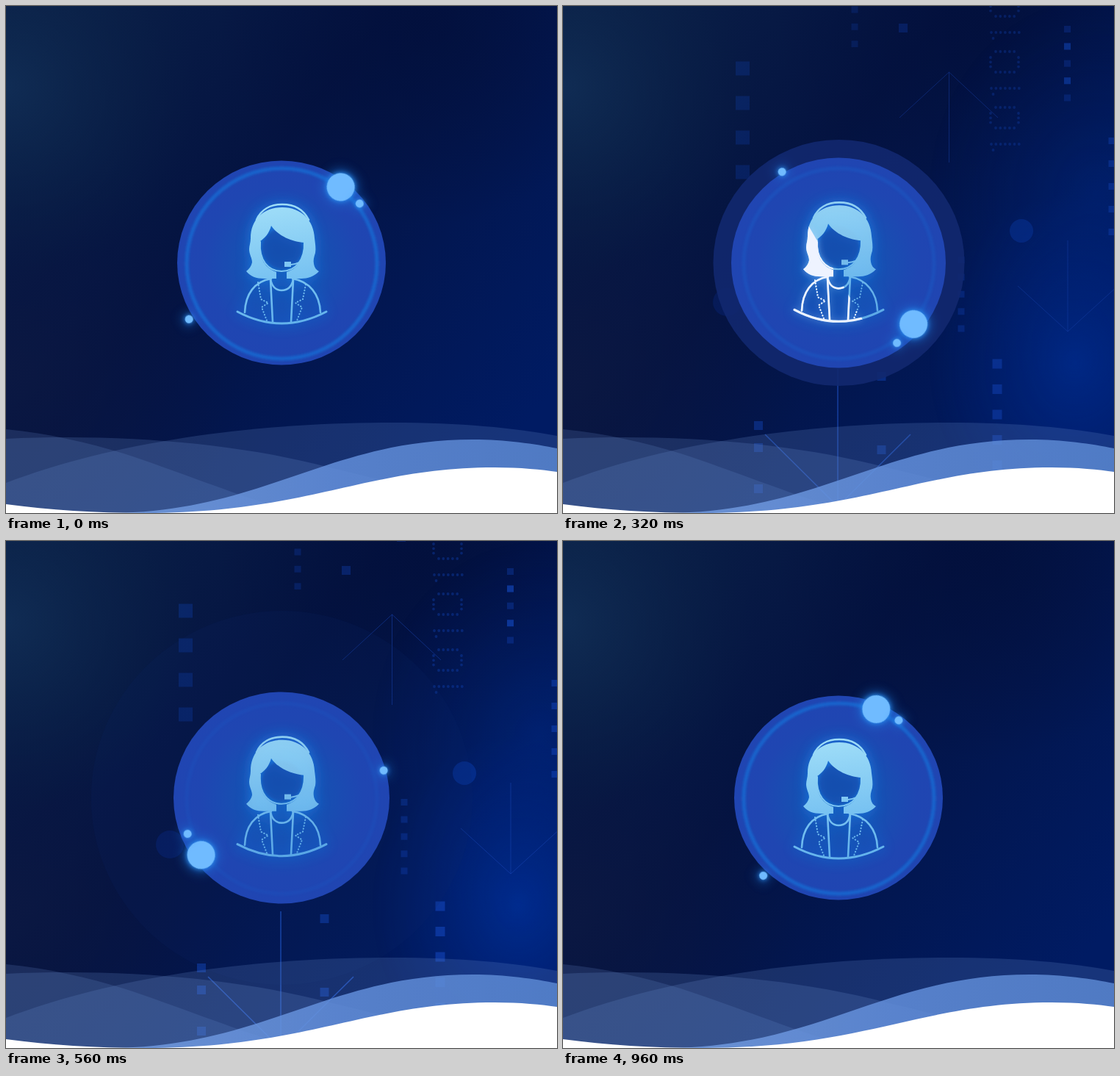
Recreate the animation shown at these times as an HTML page. Size 750 by 690 pixels, loop 1040 ms.

```html
<!DOCTYPE html>
<html lang="en">
<head>
<meta charset="utf-8">
<title>Support agent</title>
<style>
html, body { margin: 0; height: 100%; overflow: hidden; background: #04123f; }
svg { display: block; width: 100vw; height: 100vh; }
#orbit circle { fill: #70bbff; filter: drop-shadow(0 0 3px #2d8ff0) drop-shadow(0 0 8px #1c7be0); }
#shine { filter: drop-shadow(0 0 5px rgba(190, 220, 255, .45)); }
</style>
</head>
<body>
<svg viewBox="0 0 750 690" preserveAspectRatio="none">
  <defs>
    <linearGradient id="sky" x1="0" y1="0" x2="1" y2=".75">
      <stop offset="0" stop-color="#0b2148"/>
      <stop offset=".45" stop-color="#041341"/>
      <stop offset="1" stop-color="#001b63"/>
    </linearGradient>
    <radialGradient id="teal" gradientUnits="userSpaceOnUse" cx="0" cy="110" r="260">
      <stop offset="0" stop-color="#102c54"/>
      <stop offset="1" stop-color="#0a2145" stop-opacity="0"/>
    </radialGradient>
    <radialGradient id="dusk" gradientUnits="userSpaceOnUse" cx="0" cy="500" r="320">
      <stop offset="0" stop-color="#0b1842"/>
      <stop offset="1" stop-color="#081442" stop-opacity="0"/>
    </radialGradient>
    <radialGradient id="night" gradientUnits="userSpaceOnUse" cx="570" cy="20" r="280">
      <stop offset="0" stop-color="#020f3b" stop-opacity=".75"/>
      <stop offset="1" stop-color="#020f3b" stop-opacity="0"/>
    </radialGradient>
    <radialGradient id="haze">
      <stop offset="0" stop-color="#0039b0" stop-opacity=".62"/>
      <stop offset=".5" stop-color="#002f9c" stop-opacity=".36"/>
      <stop offset="1" stop-color="#002a90" stop-opacity="0"/>
    </radialGradient>
    <radialGradient id="blue">
      <stop offset="0" stop-color="#1253b1"/>
      <stop offset=".45" stop-color="#184eb2"/>
      <stop offset=".75" stop-color="#1f46b2"/>
      <stop offset="1" stop-color="#2045b2"/>
    </radialGradient>
    <linearGradient id="ice" gradientUnits="userSpaceOnUse" x1="365" y1="268" x2="385" y2="434">
      <stop offset="0" stop-color="#a0def8"/>
      <stop offset=".6" stop-color="#79c3f2"/>
      <stop offset="1" stop-color="#62b2ec"/>
    </linearGradient>
    <linearGradient id="swell" x1="0" x2="1">
      <stop offset="0" stop-color="#759fe2"/>
      <stop offset=".5" stop-color="#6390dc"/>
      <stop offset="1" stop-color="#5b89d2"/>
    </linearGradient>
    <filter id="soft" x="-10%" y="-10%" width="120%" height="120%"><feGaussianBlur stdDeviation="1.6"/></filter>
    <filter id="wide" x="-40%" y="-40%" width="180%" height="180%"><feGaussianBlur stdDeviation="9"/></filter>
    <clipPath id="band"><rect id="beam" y="-160" width="76" height="320"/></clipPath>

    <g id="agent">
      <g stroke="none">
        <path d="M333 316C333 291 350 274 376 274C402 274 419 292 420 316C421 324 422 330 421 336C419 342 418 346 419 351C420 356 422 359 426 361C420 368 410 371 402 371L382 371L382 362C398 357 405 345 406 322C390 321 370 313 361 299C358 310 352 316 346 320C344 340 350 356 368 362L368 371L352 371C340 371 333 368 327 361C331 358 334 354 335 349C335 343 331 338 331 331C331 326 333 322 333 316Z"/>
        <rect x="379" y="348" width="9" height="7"/>
      </g>
      <g fill="none" stroke-width="2.6" stroke-linecap="round">
        <path d="M341 291C347 277 360 270 376 270C392 270 405 277 412 291"/>
        <path d="M346 321C344 346 357 361 375 361C394 361 407 346 406 321" stroke-width="2"/>
        <path d="M388 352C396 351 402 349 406 344" stroke-width="2"/>
        <path d="M360 372C362 382 368 387 375 387C383 387 389 382 391 372"/>
        <path d="M361 371C338 375 326 392 325 417M390 371C413 375 427 392 428 417"/>
        <path d="M360 372L363 430M391 372L388 430"/>
        <path d="M315 416Q375 448 436 416" stroke-width="3"/>
        <path d="M343 376L347 399L357 404L348 410L355 428M408 379L404 399L394 404L403 410L396 428" stroke-width="2" stroke-dasharray=".5 3.5"/>
      </g>
    </g>

    <!-- Digits 0 and 1 of a dot display, lying on their side -->
    <g id="digits">
      <path d="M589 -10H615M589 18H615M582 -2V11M620 -2V11"/>
      <path d="M583 40H622M585.500 48L589 52"/>
    </g>
  </defs>

  <rect width="750" height="690" fill="url(#sky)"/>
  <rect width="750" height="690" fill="url(#night)"/>
  <rect width="750" height="690" fill="url(#dusk)"/>
  <rect width="750" height="690" fill="url(#teal)"/>

  <g id="tech">
    <ellipse cx="697" cy="490" rx="200" ry="230" fill="url(#haze)"/>
    <ellipse cx="725" cy="260" rx="230" ry="270" fill="url(#haze)" opacity=".5"/>
    <circle cx="624" cy="310" r="16" fill="#0a3db0" opacity=".5"/>
    <circle cx="223" cy="407" r="19" fill="#0c2f90" opacity=".4"/>
    <g fill="none" stroke="#1449c2">
      <!-- Columns of squares are dashed lines as wide as their dashes -->
      <path d="M244.500 79.500V240" stroke-width="19" stroke-dasharray="19 28" opacity=".32"/>
      <g stroke-width="9" stroke-dasharray="9 14.400">
        <path d="M397 -19V60" opacity=".28"/>
        <path d="M686.500 31V134" opacity=".35"/>
        <path d="M686.500 54.400V134" stroke-dasharray="9 37.800" opacity=".5"/>
        <path d="M542 345V448" opacity=".38"/>
        <path d="M747 183V316" stroke-dasharray="9 22" opacity=".5"/>
      </g>
      <path d="M591 484.500V636" stroke-width="13" stroke-dasharray="13 21.500" opacity=".6"/>
      <g stroke-width="12" opacity=".55">
        <path d="M433.500 502V614" stroke-dasharray="12 88"/>
        <path d="M266 569V611" stroke-dasharray="12 18"/>
        <path d="M266 655V667"/>
        <path d="M463 28V40M538 -17V-5" opacity=".65"/>
      </g>
      <g stroke-width="3.800" stroke-linecap="round" stroke-dasharray="0 6.300" opacity=".38">
        <use href="#digits"/>
        <use href="#digits" y="76"/>
        <use href="#digits" y="152"/>
      </g>
    </g>
    <g fill="none" stroke="#1f4cc0">
      <path d="M525.500 94V217M458 156L525.500 94L592 156" opacity=".5"/>
      <path d="M687 323V447M619 385L687 447L755 385" opacity=".5"/>
      <path d="M374 498V690M275 587L374 685L473 587" stroke="#2560dc" stroke-width="1.6" opacity=".7"/>
    </g>
  </g>

  <ellipse id="ripple" cx="375.500" cy="349.500" fill="#12296f"/>
  <ellipse id="disc" cx="375" cy="349.500" fill="url(#blue)"/>
  <circle id="ring" cx="375.500" cy="350.500" r="129.500" fill="none" stroke="#1263cc" stroke-width="5" filter="url(#soft)"/>

  <g id="figure">
    <use href="#agent" fill="#1a86ee" stroke="#1a86ee" filter="url(#wide)" opacity=".75"/>
    <ellipse cx="376" cy="330" rx="27" ry="27" fill="#124dae" filter="url(#soft)" opacity=".65"/>
    <use id="base" href="#agent" fill="url(#ice)" stroke="url(#ice)"/>
    <g id="shine"><g clip-path="url(#band)"><use href="#agent" fill="#eef3ff" stroke="#eef3ff"/></g></g>
  </g>

  <g id="orbit">
    <circle cx="132.500" r="19" transform="rotate(-51.700)"/>
    <circle cx="135.200" r="5.500" transform="rotate(-37.100)"/>
    <circle cx="145.700" r="5.500" transform="rotate(148.600)"/>
  </g>

  <g fill="#688ccd">
    <path d="M0 576C60 582 110 594 160 609C230 632 300 660 345 674L400 690H0Z" fill-opacity=".2"/>
    <path d="M0 589C150 582 300 594 420 623C520 647 600 668 690 690H0Z" fill-opacity=".22"/>
    <path d="M0 649C150 592 340 567 525 567C620 567 690 574 750 585V690H0Z" fill-opacity=".22"/>
  </g>
  <path d="M145 690C350 688 440 590 635 590C680 590 720 596 750 602V690Z" fill="url(#swell)" fill-opacity=".83"/>
  <path d="M0 678C60 686 120 690 190 690C410 690 490 628 665 628C700 628 730 631 750 634V690H0Z" fill="#fff"/>
</svg>
<script>
const LOOP = 1040, TICK = 80, PEAK = 480;
const $ = id => document.getElementById(id);
const set = (id, attrs) => { for (const k in attrs) $(id).setAttribute(k, attrs[k]); };

// Steady at first, then a faster turn that slows down
function turn(t) {
  const s = Math.max(0, t - 320);
  return .282 * Math.min(t, 320) + .4675 * s - .000108 * s * s;
}

// Slow drift down, gathering speed after the peak
function drift(t) {
  const s = (t - PEAK) / 160;
  return s < 0 ? 4 * s : 11 * s + 2 * s * s;
}

function draw(t) {
  const swell = Math.max(0, 1 - Math.abs(t - PEAK) / PEAK);
  set('disc', { rx: 142 + 6 * swell, ry: 139 + 6 * swell });
  set('ring', { opacity: 1 - swell });
  set('figure', { transform: `translate(0 ${-4 * swell})` });
  set('base', { opacity: 1 - .15 * swell });

  const spread = 142 + 80 * (t / PEAK) ** 2.5;
  const fade = .9 * Math.max(0, 1 - Math.abs(t - 320) / 288);
  set('ripple', { rx: spread, ry: spread * .98, opacity: fade });

  set('tech', {
    transform: `translate(0 ${drift(t)})`,
    opacity: Math.sin(Math.PI * Math.min(1, t / (2 * PEAK))) ** 2
  });

  const edge = .56 * t - 168;
  set('beam', { transform: `translate(375 350) rotate(150) translate(${edge} 0)` });
  set('orbit', { transform: `translate(373.5 350.4) rotate(${turn(t)})` });
}

let start;
function frame(now) {
  start ??= now;
  draw(Math.floor((now - start) % LOOP / TICK) * TICK);
  requestAnimationFrame(frame);
}
draw(0);
requestAnimationFrame(frame);
</script>
</body>
</html>
```
